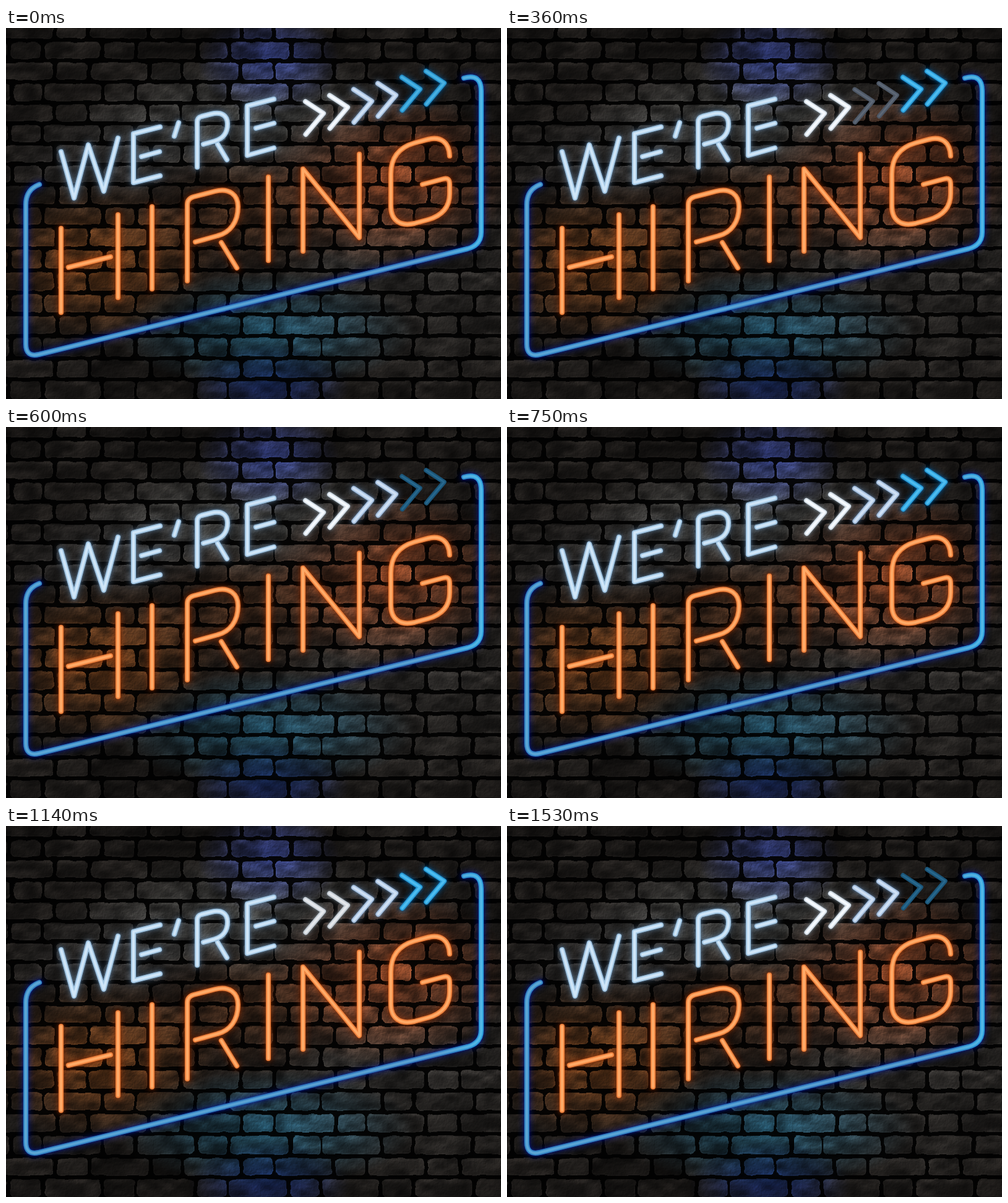
An HTML page with a canvas for the animation above (1560 ms loop, 800x600 px).

```html
<!DOCTYPE html>
<html lang="en">
<head>
<meta charset="utf-8">
<title>Neon sign</title>
<style>
html, body { margin: 0; width: 100%; height: 100%; overflow: hidden; background: #050404; }
canvas, svg { position: absolute; left: 0; top: 0; width: 800px; height: 600px; }
path { fill: none; stroke-linecap: round; stroke-linejoin: round; }
.off { stroke: var(--off); stroke-width: 7.5; }
.off.core { stroke: var(--offcore); stroke-width: 3; }
.halo { stroke: var(--halo); stroke-width: 14; opacity: .36; filter: blur(5px); }
.near { stroke: var(--near); stroke-width: 10; opacity: .55; filter: blur(1.5px); }
.tube { stroke: var(--tube); stroke-width: 8; }
.core { stroke: var(--core); stroke-width: 4; filter: blur(.7px); }

.frame { --off: #1c4f86; --offcore: #2a629a; --halo: #0018b0; --near: #04209a; --tube: url(#rim); --core: url(#rimCore); }
.white { --off: #707d88; --offcore: #8a959e; --halo: #6f8fae; --near: #5b80a4; --tube: #a5c8e4; --core: #d0e6f8; }
.orange { --off: #7c3a18; --offcore: #944a24; --halo: #962e00; --near: #8c3408; --tube: #ee8440; --core: #ffab68; }
.pair1 { --off: #6a6866; --offcore: #7a7876; --halo: #808890; --near: #788894; --tube: #d5dfe8; --core: #f6faff; }
.pair2 { --off: #4e5866; --offcore: #5e6876; --halo: #6584a8; --near: #587a9e; --tube: #a9c2e0; --core: #cfe0f4; }
.pair3 { --off: #1b5578; --offcore: #28688d; --halo: #0066b0; --near: #0b62a4; --tube: #2c9fda; --core: #4dbcf0; }

.orange .lit { animation: flicker 1560ms step-end infinite; }
[class^=pair] .lit { animation: blink 1560ms linear infinite; }
.pair2 .lit { animation-delay: -1350ms; }
.pair3 .lit { animation-delay: -1140ms; }

@keyframes flicker { 0% { opacity: 1 } 26.9% { opacity: 0 } 34.6% { opacity: 1 } }
/* Two dark spells, 870 ms apart */
@keyframes blink {
  0%, 6.1% { opacity: 1 } 8%, 15.7% { opacity: 0 } 17.6%, 61.9% { opacity: 1 }
  63.8%, 71.5% { opacity: 0 } 73.4%, 100% { opacity: 1 }
}
</style>
</head>
<body>
<canvas id="wall" width="800" height="600"></canvas>
<svg id="sign" viewBox="0 0 800 600" role="img" aria-label="We're hiring">
  <defs>
    <linearGradient id="rim" gradientUnits="userSpaceOnUse" x1="30" y1="0" x2="770" y2="0">
      <stop offset="0" stop-color="#3585c4"/><stop offset=".9" stop-color="#3478bc"/><stop offset="1" stop-color="#2c9cda"/>
    </linearGradient>
    <linearGradient id="rimCore" gradientUnits="userSpaceOnUse" x1="30" y1="0" x2="770" y2="0">
      <stop offset="0" stop-color="#5ba6d6"/><stop offset=".9" stop-color="#5a9fd0"/><stop offset="1" stop-color="#50b8e8"/>
    </linearGradient>
  </defs>
</svg>
<script>
const W = 800, H = 600;

// Repeatable hash in 0..1
function hash(x, y) {
  let n = Math.imul(x, 374761393) + Math.imul(y, 668265263) | 0;
  n = Math.imul(n ^ n >>> 13, 1274126177);
  return ((n ^ n >>> 16) >>> 0) / 4294967296;
}

function noise(x, y) {
  const i = Math.floor(x), j = Math.floor(y);
  let u = x - i, v = y - j;
  u *= u * (3 - 2 * u);
  v *= v * (3 - 2 * v);
  const a = hash(i, j), b = hash(i + 1, j), c = hash(i, j + 1), d = hash(i + 1, j + 1);
  return a + (b - a) * u + (c - a + (a - b - c + d) * u) * v;
}

function layer() {
  const c = document.createElement('canvas');
  c.width = W;
  c.height = H;
  return c.getContext('2d', { willReadFrequently: true });
}

function drawBricks() {
  const g = layer();
  const joints = [-14, 20, 53, 87, 121, 154, 187, 220, 253, 288, 321, 356, 392, 428, 463, 498, 534, 568, 603];
  const grey = v => `rgb(${v},${v},${v})`;
  g.fillStyle = grey(12);
  g.fillRect(0, 0, W, H);
  g.lineWidth = 1.5;
  const brick = (x, y, w, h, tone) => {
    const s = g.createLinearGradient(0, y, 0, y + h);
    s.addColorStop(0, grey(tone + 30));
    s.addColorStop(.25, grey(tone));
    s.addColorStop(1, grey(tone - 12));
    g.fillStyle = s;
    g.strokeStyle = grey(tone + 26);
    g.beginPath();
    g.roundRect(x, y, w, h, 5);
    g.fill();
    g.stroke();
  };
  for (let r = 0; r < joints.length - 1; r++) {
    const y = joints[r] + 4, h = joints[r + 1] - joints[r] - 8;
    for (let k = -1; k < 6; k++) {
      const x = (r % 2 ? 62 : -14) + k * 150 + hash(k, r) * 4 - 2;
      const cut = x + 95 + hash(k + 40, r) * 6 - 3;
      brick(x + 1, y, cut - x - 5, h, 112 + hash(k, r + 50) * 60);
      brick(cut + 4, y, x + 144 - cut - 4, h, 112 + hash(k, r + 90) * 60);
    }
  }
  return g.getImageData(0, 0, W, H).data;
}

function roughen(src, g) {
  const img = g.createImageData(W, H), grain = new Float32Array(W * H);
  for (let y = 0, p = 0; y < H; y++)
    for (let x = 0; x < W; x++, p++)
      grain[p] = noise(x / 9, y / 7) * .7 + noise(x / 4, y / 3.5) * .5 + noise(x / 1.8, y / 1.8) * .3;
  const shift = (v, n, max) => Math.min(max - 1, Math.max(0, Math.round(v + (n - .5) * 3)));
  for (let y = 0, p = 0; y < H; y++) {
    for (let x = 0; x < W; x++, p++) {
      const sx = shift(x, noise(x / 8, y / 8 + 99), W);
      const sy = shift(y, noise(x / 11 + 99, y / 8), H);
      const slope = grain[p] - grain[Math.min(W * H - 1, p + W + 1)];
      const stain = .55 + .8 * noise(x / 20 + 7, y / 11 + 3);
      const v = src[(sy * W + sx) * 4] * stain * (1 + slope * .7);
      img.data[p * 4] = img.data[p * 4 + 1] = img.data[p * 4 + 2] = v;
      img.data[p * 4 + 3] = 255;
    }
  }
  g.putImageData(img, 0, 0);
}

function lightMap() {
  const g = layer();
  g.fillStyle = 'rgb(46,42,39)';
  g.fillRect(0, 0, W, H);
  g.globalCompositeOperation = 'lighter';
  const glow = (x, y, rx, ry, rgb) => {
    g.save();
    g.translate(x, y);
    g.scale(rx, ry);
    const s = g.createRadialGradient(0, 0, 0, 0, 0, 1);
    s.addColorStop(0, `rgba(${rgb},1)`);
    s.addColorStop(.5, `rgba(${rgb},.55)`);
    s.addColorStop(1, `rgba(${rgb},0)`);
    g.fillStyle = s;
    g.fillRect(-1, -1, 2, 2);
    g.restore();
  };
  glow(425, 55, 115, 85, '30,52,158');
  glow(425, 580, 130, 70, '0,28,118');
  glow(420, 490, 240, 95, '0,72,108');
  glow(150, 380, 190, 135, '116,48,0');
  glow(620, 245, 200, 145, '150,54,12');
  glow(380, 300, 190, 110, '54,20,0');
  glow(400, 150, 290, 110, '60,65,66');
  glow(180, 220, 190, 100, '30,32,34');
  glow(620, 400, 330, 210, '28,29,29');
  return g.canvas;
}

function paintWall() {
  const g = document.getElementById('wall').getContext('2d');
  roughen(drawBricks(), g);
  g.globalCompositeOperation = 'multiply';
  g.drawImage(lightMap(), 0, 0);
}

function neon(name, d) {
  const strokes = list => list.map(c => `<path class="${c}" d="${d}"/>`).join('');
  document.getElementById('sign').insertAdjacentHTML('beforeend',
    `<g class="${name}">${strokes(['off', 'off core'])}` +
    `<g class="lit">${strokes(['halo', 'near', 'tube', 'core'])}</g></g>`);
}

const chevron = i => `M${484 + i * 39} ${119 - i * 9.8}l29 19l-28.5 34`;

paintWall();
neon('frame', 'M54 253Q32 261 32 286V511Q32 533 53 528L746 357Q768 351 768 330V102Q768 73 740 81');
neon('white', `M89 200L110 275L133 189L158 264L181 178
  M249 160L206 171V250L249 239M219 208L248 200M279 153L272 175
  M309 225V152Q309 145 316 143L332 139C349 135 358 142 358 155C358 171 350 179 337 183L319 188M342 188L357 213
  M433 115L390 126V206L433 194M404 162L433 154`);
neon('orange', `M89 324V460M181 302V436M101 387L169 370M236 289V422
  M293 409V286Q293 276 303 273L338 264C361 258 375 270 375 289C375 314 362 331 342 336L306 346M348 347L373 388
  M424 241V376M480 361V228L571 339V204
  M717 207C716 184 702 175 682 180L660 186Q622 197 622 236V288C622 312 638 321 660 316L682 310Q717 300 717 268V253Q717 241 707 244L673 253`);
[1, 2, 3].forEach(n => neon('pair' + n, chevron(2 * n - 2) + chevron(2 * n - 1)));
</script>
</body>
</html>
```
